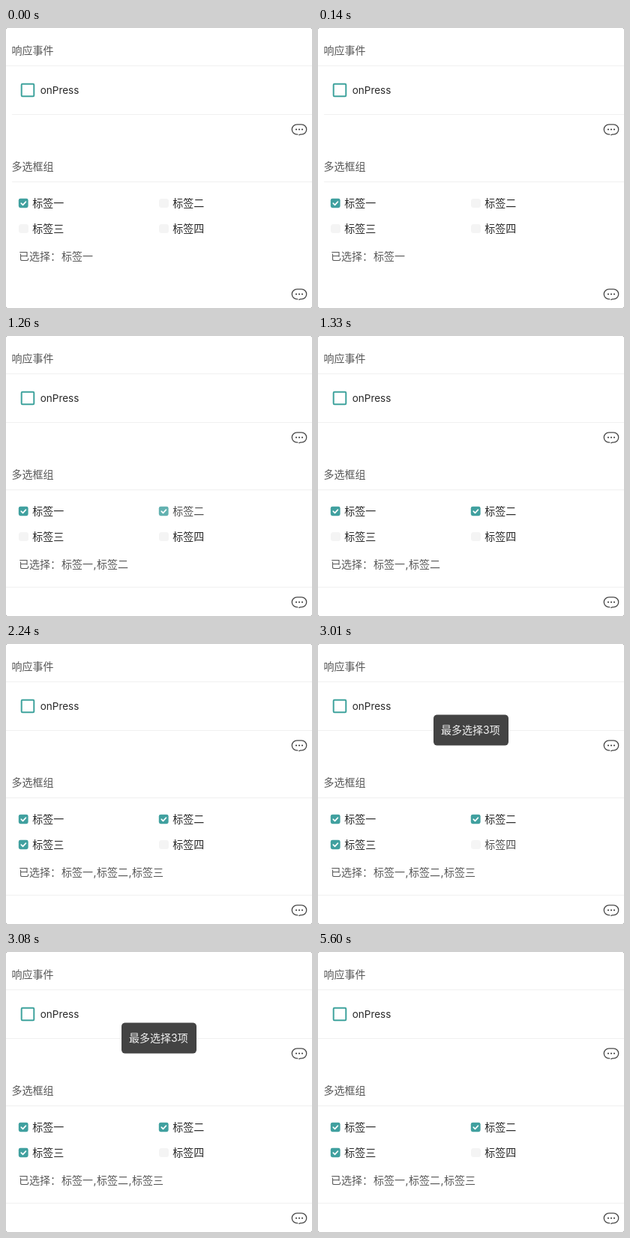
An HTML page that plays this animation: 408 by 374 pixels, repeating every 5.81 s.

```html
<!DOCTYPE html>
<html lang="zh-CN">
<head>
<meta charset="utf-8">
<title>多选框</title>
<style>
  html, body { margin: 0; width: 100%; height: 100%; overflow: hidden; background: #888; }
  svg { display: block; width: 408px; height: 374px; }
  text { font: 14px Inter, "Noto Sans CJK SC", "Noto Sans CJK", sans-serif; fill: #585858; }
  .label { fill: #282828; }
  .press { font-size: 13.5px; }
  .divider { stroke: #f0f0f0; }
  .off { fill: #f4f4f4; }
  .on rect { fill: #40a09f; }
  .on path { fill: none; stroke: #fff; stroke-width: 1.7; stroke-linecap: round; stroke-linejoin: round; }
  .toast rect { fill: #434343; }
  .toast text { fill: #f2f2f2; }

  .second, .third, .toast, .tap-second, .tap-fourth {
    animation: 5810ms step-end infinite;
  }
  .second { animation-name: second; }
  .third { animation-name: third; }
  .toast { animation-name: toast; }
  .tap-second { animation-name: tap-second; }
  .tap-fourth { animation-name: tap-fourth; }

  @keyframes second { 0% { opacity: 0 } 21.68%, 100% { opacity: 1 } }
  @keyframes third { 0% { opacity: 0 } 38.55%, 100% { opacity: 1 } }
  @keyframes toast { 0% { opacity: 0 } 51.8% { opacity: 1 } 96.38%, 100% { opacity: 0 } }
  @keyframes tap-second { 0% { opacity: 1 } 21.68% { opacity: .82 } 22.89%, 100% { opacity: 1 } }
  @keyframes tap-fourth { 0% { opacity: 1 } 51.8% { opacity: .82 } 53.01%, 100% { opacity: 1 } }
</style>
</head>
<body>
<svg viewBox="0 0 408 374">
  <defs>
    <rect id="off" class="off" width="13" height="12" rx="3.5"/>
    <g id="on" class="on">
      <rect x="-.2" y="-.2" width="12.8" height="12.4" rx="2.4"/>
      <path d="M3.3 6.1 5.5 8.3 9.4 4.2"/>
    </g>
    <g id="bubble">
      <path d="M-2.2 6.7H-3A6.7 6.7 0 0 1-3-6.7H3A6.7 6.7 0 0 1 3 6.7H1.4L-.2 7.3"
            fill="none" stroke="#484848" stroke-width="1.3" stroke-linecap="round"/>
      <g fill="#404040"><circle cx="-4" r="1.1"/><circle r="1.1"/><circle cx="4" r="1.1"/></g>
    </g>
  </defs>

  <rect width="408" height="374" rx="2" fill="#fff"/>

  <path class="divider" d="M0 50.5H408M8 115.5H408M8 205.5H408"/>
  <path class="divider second" d="M0 115.5H8M0 205.5H8M0 335.5H408"/>

  <text x="7.5" y="35.3">响应事件</text>
  <rect x="20.7" y="74.7" width="16.6" height="16.6" rx="1.2" fill="none" stroke="#3fa39d" stroke-width="2"/>
  <text class="label press" x="45.7" y="87.7">onPress</text>
  <use href="#bubble" x="391" y="135.5"/>

  <text x="7.5" y="190.3">多选框组</text>
  <use href="#on" x="17" y="228"/>
  <text class="label" x="35.3" y="239">标签一</text>

  <g class="tap-second">
    <use href="#off" x="204" y="228"/>
    <use href="#on" class="second" x="204" y="228"/>
    <text class="label" x="222.3" y="239">标签二</text>
  </g>

  <use href="#off" x="17" y="262"/>
  <use href="#on" class="third" x="17" y="262"/>
  <text class="label" x="35.3" y="273.3">标签三</text>

  <g class="tap-fourth">
    <use href="#off" x="204" y="262"/>
    <text class="label" x="222.3" y="273.3">标签四</text>
  </g>

  <text x="17" y="310.3">已选择：</text>
  <text x="74" y="310.3">标签一</text>
  <g class="second"><text x="116.5" y="310.3">,</text><text x="121" y="310.3">标签二</text></g>
  <g class="third"><text x="163.5" y="310.3">,</text><text x="168" y="310.3">标签三</text></g>
  <use href="#bubble" x="391" y="355.5"/>

  <g class="toast">
    <rect x="154" y="94.4" width="100" height="41.2" rx="5"/>
    <text x="164" y="120.2">最多选择3项</text>
  </g>
</svg>
</body>
</html>
```
